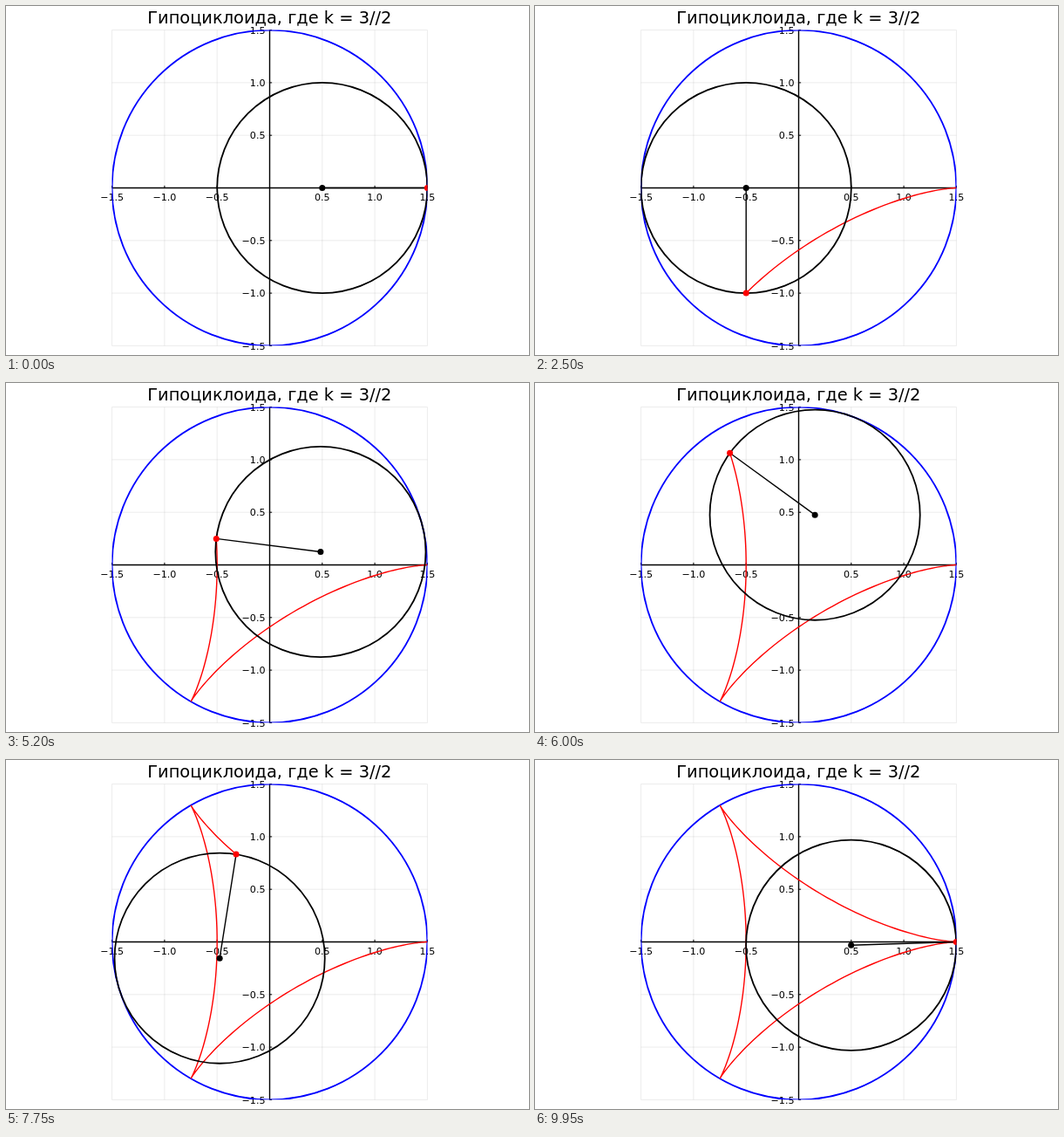
Write an HTML page with a canvas that moves like this. It is 600 by 400 pixels and loops after 10 s.

```html
<!DOCTYPE html>
<html lang="ru">
<head>
<meta charset="utf-8">
<title>Гипоциклоида</title>
<style>
  html, body { margin: 0; width: 100%; height: 100%; overflow: hidden; background: #fff; }
  canvas { display: block; }
</style>
</head>
<body>
<canvas id="stage" width="600" height="400"></canvas>
<script>
const ctx = document.getElementById('stage').getContext('2d');
const STEPS = 200, STEP_MS = 50;
const R = 1.5, r = 1, k = R / r;
const UNIT = 120.6;
const X = x => 302.5 + x * UNIT;
const Y = y => 208.5 - y * UNIT;
const TICKS = [-1.5, -1, -0.5, 0, 0.5, 1, 1.5];

const angle = step => 4 * Math.PI * step / STEPS;
const center = a => [(R - r) * Math.cos(a), (R - r) * Math.sin(a)];
const pen = a => {
  const [x, y] = center(a);
  return [x + r * Math.cos((k - 1) * a), y - r * Math.sin((k - 1) * a)];
};

function polyline(points, color, width) {
  ctx.beginPath();
  for (const [x, y] of points) ctx.lineTo(X(x), Y(y));
  ctx.strokeStyle = color;
  ctx.lineWidth = width;
  ctx.stroke();
}

function circle([x, y], radius, color, width) {
  ctx.beginPath();
  ctx.arc(X(x), Y(y), radius * UNIT, 0, 2 * Math.PI);
  ctx.strokeStyle = color;
  ctx.lineWidth = width;
  ctx.stroke();
}

function dot([x, y], color) {
  ctx.beginPath();
  ctx.arc(X(x), Y(y), 3.5, 0, 2 * Math.PI);
  ctx.fillStyle = color;
  ctx.fill();
}

function text(label, x, y, size, align) {
  ctx.font = `${size}px "DejaVu Sans", sans-serif`;
  ctx.textAlign = align;
  ctx.fillStyle = '#000';
  ctx.fillText(label, x, y);
}

function drawAxes() {
  for (const t of TICKS) {
    polyline([[t, -R], [t, R]], 'rgba(0,0,0,0.1)', 0.8);
    polyline([[-R, t], [R, t]], 'rgba(0,0,0,0.1)', 0.8);
  }
  polyline([[-R, 0], [R, 0]], '#000', 1.4);
  polyline([[0, -R], [0, R]], '#000', 1.4);
  for (const t of TICKS) {
    polyline([[t, 0], [t, 0.022]], '#000', 1);
    polyline([[0, t], [0.022, t]], '#000', 1);
    if (!t) continue;
    const label = t.toFixed(1).replace('-', '\u2212');
    text(label, X(t), 223, 11.1, 'center');
    text(label, 297.5, Y(t) + 4.2, 11.1, 'right');
  }
  text('Гипоциклоида, где k = 3//2', 302.3, 20, 19.4, 'center');
}

function draw(step) {
  const a = angle(step), c = center(a), p = pen(a);
  const trail = Array.from({ length: step + 1 }, (_, i) => pen(angle(i)));
  ctx.fillStyle = '#fff';
  ctx.fillRect(0, 0, 600, 400);
  drawAxes();
  ctx.save();
  ctx.beginPath();
  ctx.rect(121.5, 27.5, 362, 361.8);
  ctx.clip();
  circle([0, 0], R, '#00f', 1.8);
  polyline(trail, '#f00', 1.4);
  circle(c, r, '#000', 1.8);
  polyline([c, p], '#000', 1.4);
  dot(c, '#000');
  dot(p, '#f00');
  ctx.restore();
}

function tick() {
  draw(Math.floor(performance.now() / STEP_MS) % STEPS);
  requestAnimationFrame(tick);
}
tick();
</script>
</body>
</html>
```
